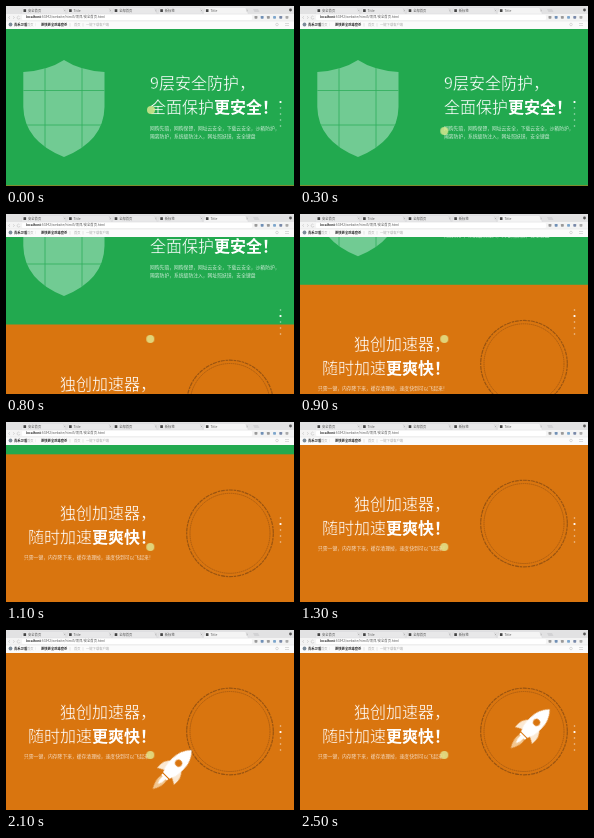
An HTML page that plays this animation: 288 by 180 pixels, repeating every 3100 ms.

```html
<!DOCTYPE html>
<html>
<head>
<meta charset="utf-8">
<title>Scroll page</title>
<style>
html, body { margin: 0; width: 100%; height: 100%; overflow: hidden; background: #d9750f; }
svg { display: block; width: 100%; height: 100%; }
text { font-family: "Noto Sans CJK SC", "Noto Sans CJK", "Noto Sans", sans-serif; white-space: pre; }
.green { --page: #22a94f; }
.orange { --page: #d9750f; }
.paper { fill: var(--page); }
/* a thin outline in the page colour makes the strokes finer */
.head { font-size: 16px; font-weight: 300; fill: #fff; stroke: var(--page); stroke-width: .3px; }
.head .bold { font-weight: 900; stroke: none; }
.note { font-size: 4.8px; fill: #fff; fill-opacity: .76; }
.ui { font-size: 3.3px; fill: #555; }
.soft { fill: #aaa; }
.dark { fill: #222; font-weight: 700; }

/* the script steps --t in tenths of a second */
.move { animation: 3100ms linear infinite paused; animation-delay: calc(var(--t, 0) * -1ms); }
#pages { animation-name: scroll; }
#rocket { animation-name: fly; }
#active { animation-name: next; }
#pointer { animation-name: point; }
@keyframes scroll {
  0% { transform: translateY(0); }
  19.84% { transform: translateY(0); animation-timing-function: ease; }
  42.42%, 100% { transform: translateY(-157px); }
}
@keyframes fly {
  0%, 48.387% { transform: translate(-160px, 102px); }
  80.645%, 100% { transform: translate(0, 0); }
}
@keyframes next {
  0%, 22.5% { transform: translateY(0); }
  22.501%, 100% { transform: translateY(6px); }
}
@keyframes point {
  0%, 3.226% { transform: translate(145px, 104px); }
  9.677%, 100% { transform: translate(144.3px, 125px); }
}
</style>
</head>
<body>
<svg viewBox="0 0 288 180" preserveAspectRatio="none">
  <defs>
    <path id="shield" d="M58 54Q42 64.500 17.300 66V101Q18 135 58 151Q98 135 98.500 101V66Q74 64.500 58 54Z"/>
    <clipPath id="inside"><use href="#shield"/></clipPath>
  </defs>
  <g id="pages" class="move">
    <g class="green">
      <rect class="paper" y="20" width="288" height="161"/>
      <use href="#shield" fill="#71cb93"/>
      <path clip-path="url(#inside)" d="M39 50V150M76 50V150M17 84.500H99M17 119H99" stroke="#2fae5b" stroke-width=".8"/>
      <text class="head" x="144" y="82.500">9层安全防护，</text>
      <text class="head" x="144" y="107.300">全面保护<tspan class="bold">更安全！</tspan></text>
      <text class="note" x="144" y="124">网购先赔，网购保镖，网址云安全，下载云安全，沙箱防护，</text>
      <text class="note" x="144" y="132">隔离防护，系统级防注入，网址照妖镜，安全键盘</text>
    </g>
    <g class="orange" transform="translate(0 157)">
      <rect class="paper" y="22.500" width="288" height="158"/>
      <text class="head" x="54" y="87.600">独创加速器，</text>
      <text class="head" x="22" y="111.600">随时加速<tspan class="bold">更爽快！</tspan></text>
      <text class="note" x="18" y="127.600">只需一键，内存降下来，缓存清理掉，速度快到可以飞起来！</text>
      <g fill="none" stroke="#9a5410">
        <circle cx="224" cy="101.500" r="43.300" stroke-width="1.200" stroke-dasharray="4 .9 2.500 .7"/>
        <circle cx="224" cy="101.500" r="40" stroke-width=".7" stroke-dasharray="1.500 .6"/>
      </g>
    </g>
  </g>

  <g id="rocket" class="move">
    <g transform="translate(249.700 79.300) rotate(45)">
      <path d="M-3.500 39Q-5.500 46 0 55Q5.500 46 3.500 39Z" fill="#f3c68f"/>
      <path d="M-2 39Q-2.500 44 0 48Q2.500 44 2 39Z" fill="#fff"/>
      <path d="M-7 22Q-13 26 -12 37L-5 33ZM7 22Q13 26 12 37L5 33Z" fill="#fbe9d3"/>
      <path d="M0 0Q8 8 8 20Q8 29 4.500 36H-4.500Q-8 29 -8 20Q-8 8 0 0Z" fill="#fff"/>
      <rect x="-4" y="37" width="8" height="2" fill="#fff"/>
      <circle cy="18.500" r="3.600" fill="#d9750f"/>
    </g>
  </g>

  <g id="dots" fill="#fff"></g>
  <circle id="active" class="move" cx="274.500" cy="96" r="1.100" fill="#fff"/>
  <circle id="pointer" class="move" r="4" fill="#e2eb94" fill-opacity=".8"/>

  <g id="browser">
    <rect width="288" height="23" fill="#fbfbfb"/>
    <rect width="288" height="8" fill="#e2e2e3"/>
    <g id="tabs"></g>
    <rect y="8" width="288" height="7" fill="#f4f4f4"/>
    <rect x="16" y="9" width="230" height="5" rx="1" fill="#fff"/>
    <path d="M0 15H288" stroke="#dcdcdc" stroke-width=".5"/>
    <path d="M4 10.200L2.500 11.500L4 12.800M7 10.200L8.500 11.500L7 12.800M13.500 10.500A1.500 1.500 0 1 0 14 12" fill="none" stroke="#bbb" stroke-width=".5"/>
    <text class="ui" x="20" y="12.200"><tspan class="dark">localhost</tspan>:63342/website/html5/项目/安全首页.html</text>
    <g id="tools"></g>
    <circle cx="4.500" cy="18.500" r="1.900" fill="#7d8c99"/>
    <text class="ui dark" x="8" y="19.700" font-weight="400">青禾卫盾</text>
    <text class="ui soft" x="21" y="19.700">首页 ｜</text>
    <text class="ui dark" x="35" y="19.700">更快更全病毒查杀</text>
    <text class="ui soft" x="68" y="19.700">首页</text>
    <text class="ui soft" x="80" y="19.700">一键下载客户端</text>
    <path d="M64 17V20.500M77 17V20.500" stroke="#ccc" stroke-width=".5"/>
    <circle cx="271" cy="18.500" r="1.300" fill="none" stroke="#bbb" stroke-width=".5"/>
    <path d="M279 17.500H283M279 19.500H283" stroke="#bbb" stroke-width=".5"/>
  </g>
</svg>
<script>
const byId = id => document.getElementById(id);
const fill = (id, list, draw) => { byId(id).innerHTML = list.map(draw).join(""); };

fill("dots", [0, 1, 2, 3, 4], i =>
  `<circle cx="274.500" cy="${96 + i * 6}" r=".8" opacity=".6"/>`);

fill("tabs", ["安全首页", "Title", "全部首页", "新标签", "Title"], (name, i) => {
  const x = 15 + i * 45.6, open = i === 4;
  return `<path d="M${x} 8L${x + 2} 1.500H${x + 42}L${x + 45} 8Z" fill="${open ? "#f4f4f4" : "#e8e8e9"}" stroke="#d0d0d2" stroke-width=".3"/>
    <rect x="${x + 2.5}" y="3.200" width="2.600" height="2.800" fill="#444"/>
    <text class="ui" x="${x + 7}" y="5.800">${name}</text>
    <path d="M${x + 43} 3.800L${x + 44.4} 5.200M${x + 44.4} 3.800L${x + 43} 5.200" stroke="#999" stroke-width=".4"/>`;
});
byId("tabs").innerHTML += `<path d="M247 3H252L253.500 6H248.500Z" fill="#d2d2d4"/>
  <circle cx="284.500" cy="4" r="1.400" fill="#555"/>`;

fill("tools", ["#999", "#6f8fb5", "#999", "#7da6cc", "#7888a8", "#aaa"], (color, i) =>
  `<rect x="${248.5 + i * 6.2}" y="9.900" width="2.900" height="2.900" rx=".7" fill="${color}"/>`);

const start = performance.now();
function tick() {
  const time = (performance.now() - start) % 3100;
  document.documentElement.style.setProperty("--t", Math.floor(time / 100) * 100);
  requestAnimationFrame(tick);
}
tick();
</script>
</body>
</html>
```
